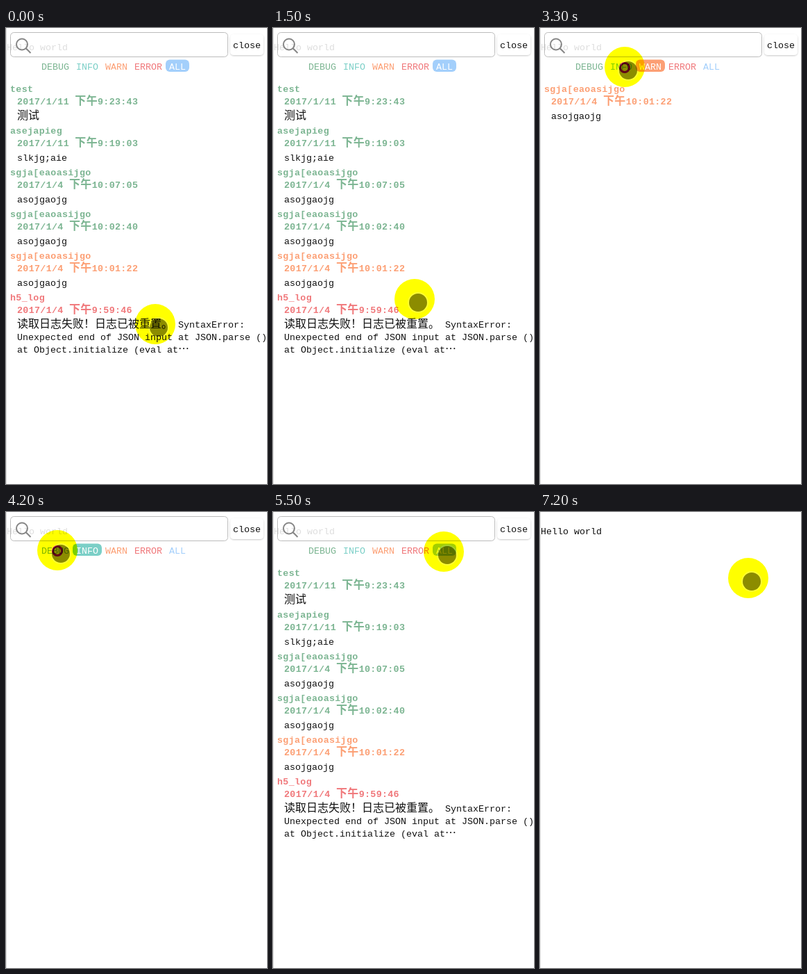
Recreate the animation shown at these times as an HTML page. Size 376 by 656 pixels, loop 7.5 s.

```html
<!DOCTYPE html>
<html lang="zh">
<head>
<meta charset="utf-8">
<style>
  html, body { margin: 0; width: 100%; height: 100%; overflow: hidden; background: #fff; }
  svg { display: block; width: 376px; height: 656px; }
  text { font: 13.333px "Liberation Mono", "DejaVu Sans Mono", monospace; white-space: pre; }
  .cjk { font-family: "Noto Sans CJK SC", "Noto Sans CJK", sans-serif; font-size: 16px; }
  .bold { font-weight: bold; letter-spacing: .33px; }
  #pointer { mix-blend-mode: multiply; }
</style>
</head>
<body>
<svg id="stage" viewBox="0 0 376 656">
  <defs>
    <filter id="shadow" x="-20%" y="-20%" width="140%" height="150%">
      <feDropShadow dx="0" dy="1" stdDeviation="1" flood-color="#000" flood-opacity=".22"/>
    </filter>
  </defs>
  <rect width="376" height="656" fill="#fff"/>
  <g id="page"></g>
  <g id="panel">
    <rect width="376" height="656" fill="#fff" opacity=".86"/>
    <rect x="6.5" y="6.5" width="313" height="35" rx="5" fill="none" stroke="#bcbcbc"/>
    <g fill="none" stroke="#858585" stroke-width="2">
      <circle cx="23" cy="23.5" r="8"/>
      <path d="M28.8 29.3L35.5 36"/>
    </g>
    <rect x="323" y="9" width="48" height="30" rx="5" fill="#fff" filter="url(#shadow)"/>
    <g id="bar"></g>
    <g id="list"></g>
  </g>
  <path d="M.5 0V656" stroke="#dcdcdc"/>
  <g id="pointer">
    <circle r="29" fill="#ff0"/>
    <circle id="ring" cy="1" r="6.5" fill="none" stroke="#b00028" stroke-width="3"/>
    <circle cx="5" cy="5" r="14" fill="none" stroke="#fff" stroke-width="2" opacity=".2"/>
    <circle cx="5" cy="5" r="13" fill="#000" opacity=".45"/>
  </g>
</svg>
<script>
const LOOP = 7500, STEP = 100;
const $ = id => document.getElementById(id);

const colors = {
  DEBUG: '#7cb592', INFO: '#7bcfc7', WARN: '#fc9f74', ERROR: '#f0787b', ALL: '#a3cffb'
};
const tabX = { DEBUG: 51, INFO: 101, WARN: 143, ERROR: 185, ALL: 235 };

const logs = [
  ['DEBUG', 'test', '2017/1/11 下午9:23:43', '测试'],
  ['DEBUG', 'asejapieg', '2017/1/11 下午9:19:03', 'slkjg;aie'],
  ['DEBUG', 'sgja[eaoasijgo', '2017/1/4 下午10:07:05', 'asojgaojg'],
  ['DEBUG', 'sgja[eaoasijgo', '2017/1/4 下午10:02:40', 'asojgaojg'],
  ['WARN', 'sgja[eaoasijgo', '2017/1/4 下午10:01:22', 'asojgaojg'],
  ['ERROR', 'h5_log', '2017/1/4 下午9:59:46', '读取日志失败！日志已被重置。 SyntaxError:',
    'Unexpected end of JSON input at JSON.parse ()', 'at Object.initialize (eval at…']
];

// [start, filter]; null means the panel is closed
const states = [
  [0, 'ALL'], [2300, 'ERROR'], [2900, 'WARN'], [3400, 'INFO'],
  [4300, 'DEBUG'], [5400, 'ALL'], [6600, null]
];
const clicks = [2200, 2800, 3300, 4200, 5300, 6500];

// [time, x, y]
const path = [
  [0, 215, 426], [700, 215, 426], [1500, 204, 390], [2100, 203, 57], [2400, 203, 57],
  [2700, 159, 56], [2900, 159, 56], [3300, 122, 56], [3500, 122, 56], [4000, 74, 55],
  [4800, 74, 55], [5200, 246, 57], [5700, 246, 57], [6300, 346, 26], [6600, 346, 26],
  [7200, 300, 95]
];

function label(x, y, str, fill = '#111', cls = '') {
  const body = str.replace(/[^\x00-\x7f]+/g, s => `<tspan class="cjk">${s}</tspan>`);
  return `<text x="${x}" y="${y}" fill="${fill}" class="${cls}">${body}</text>`;
}

function barMarkup(active) {
  return label(327, 29, 'close') + Object.keys(colors).map(name => {
    const x = tabX[name], on = name === active;
    const pill = on
      ? `<rect x="${x - 5}" y="45.5" width="${name.length * 8 + 10}" height="17.5" rx="6" fill="${colors[name]}"/>`
      : '';
    return pill + label(x, 60, name, on ? '#fff' : colors[name]);
  }).join('');
}

function listMarkup(filter) {
  return logs.filter(log => filter === 'ALL' || log[0] === filter)
    .map(([level, title, date, ...lines], i) => {
      const y = 92 + i * 60, c = colors[level];
      return label(6, y, title, c, 'bold') + label(16, y + 18, date, c, 'bold') +
        lines.map((s, n) => label(16, y + 39 + n * 18, s)).join('');
    }).join('');
}

function pointerAt(t) {
  const i = path.findIndex(p => p[0] > t);
  if (i < 0) return path[path.length - 1].slice(1);
  const [t0, x0, y0] = path[i - 1], [t1, x1, y1] = path[i];
  const u = (t - t0) / (t1 - t0), k = u * u * (3 - 2 * u);
  return [x0 + (x1 - x0) * k, y0 + (y1 - y0) * k];
}

let shown;
function draw(t) {
  const filter = states.filter(s => s[0] <= t).pop()[1];
  if (filter !== shown) {
    shown = filter;
    $('panel').style.display = filter ? '' : 'none';
    if (filter) {
      $('bar').innerHTML = barMarkup(filter);
      $('list').innerHTML = listMarkup(filter);
    }
  }
  const [x, y] = pointerAt(t);
  $('pointer').setAttribute('transform', `translate(${x.toFixed(2)} ${y.toFixed(2)})`);
  const pressed = clicks.some(c => t >= c && t < c + 2 * STEP);
  $('ring').style.display = pressed ? '' : 'none';
}

function tick() {
  const t = performance.now() % LOOP;
  draw(Math.floor(t / STEP) * STEP);
  requestAnimationFrame(tick);
}

$('page').innerHTML = label(1, 32, 'Hello world');
tick();
</script>
</body>
</html>
```
